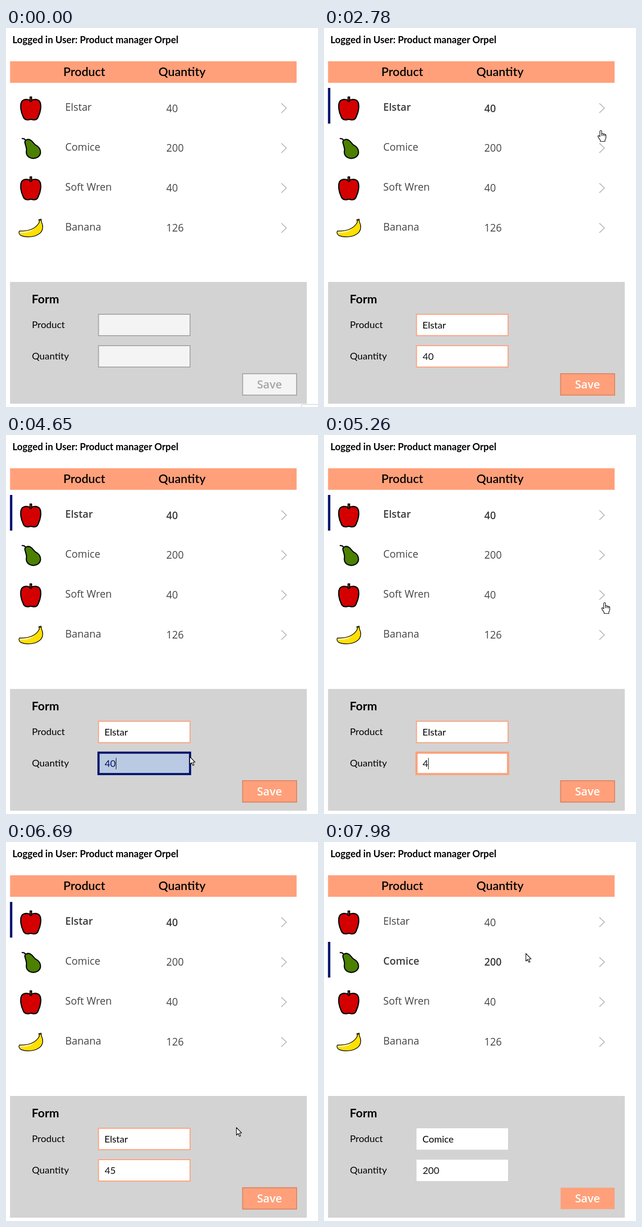
Write an HTML page that moves like this. It is 656 px wide and 797 px high and loops after 8000 ms.

```html
<!DOCTYPE html>
<html lang="en">
<head>
<meta charset="utf-8">
<title>Product form</title>
<style>
  html, body { margin: 0; width: 100%; height: 100%; overflow: hidden; background: #fff; }
  svg { display: block; font: 20px Lato, sans-serif; }
  .title { font-weight: 700; }
  .head { font-size: 25.2px; font-weight: 600; }
  .form { font-size: 25px; font-weight: 700; }
  .row { font: 21.33px "Open Sans", sans-serif; fill: #444; }
  .row.on { font-weight: 600; fill: #3a3a3a; }
  .row rect { display: none; fill: #00126b; }
  .row.on rect { display: inline; }
  .chevron { fill: none; stroke: #a2a2a2; stroke-width: 1.3; }
  .save { font: 600 23.5px "Open Sans", sans-serif; text-anchor: middle; }
  .line { fill: none; stroke: #000; }
  .cursor path { fill: #fff; stroke: #000; stroke-width: 1.2; stroke-linejoin: round; }
</style>
</head>
<body>
<svg width="656" height="797" viewBox="0 0 656 797">
  <defs>
    <g id="red" stroke="#000" stroke-width="2.6" stroke-linejoin="round">
      <path fill="#d40000" d="M52 153C46 149 36 149 32.5 156C29 164 32 178 36 186C38 192 42 193 45 193C48 193.500 50 192 52 192C54 192 57 193.500 60 193C63 193 66 192 68 186C72 178 75 164 71.500 156C68 149 58 149 52 153Z"/>
      <path fill="#a0410d" stroke-width="2" d="M50.500 145H54V154.500H50.500Z"/>
    </g>
    <g id="pear" stroke="#000" stroke-width="2.4" stroke-linecap="round">
      <path fill="none" d="M34 232.500Q40 232 42 238"/>
      <path fill="#4b8000" d="M40 242C38 236 46 232 52 236C57 239 58 243 62 246C70 250 74 257 72 265C69 273 59 276 51 273C44 270 42 264 43 258C44 252 41 247 40 242Z"/>
    </g>
    <g id="banana" stroke-linejoin="round">
      <path fill="#ffe000" stroke="#000" stroke-width="1.4" d="M69 403L74 402L74.500 408C78 414 79 424 72 431C62 440 44 441 33 437C28 435 26 431 28 427C38 427 50 426 58 421C65 417 69 411 70 408Z"/>
      <path fill="#ffeeb0" d="M29 428C40 429 52 426 60 422C52 430 40 432 29 431Z"/>
      <path fill="#4a3a00" d="M69 403L74 402L74.200 405L69.500 406Z"/>
    </g>
  </defs>

  <text class="title" x="13.5" y="31.500">Logged in User: Product manager Orpel</text>
  <rect x="8.5" y="70" width="602.5" height="45.300" fill="#ffa07a"/>
  <text class="head" x="120.5" y="101">Product</text>
  <text class="head" x="320.5" y="101">Quantity</text>
  <g id="rows"></g>

  <rect x="8.5" y="534" width="624" height="256" fill="#d3d3d3"/>
  <text class="form" x="54" y="579">Form</text>
  <text x="54.5" y="631">Product</text>
  <text x="54.5" y="697">Quantity</text>
  <rect id="productBox" x="194.5" y="602" width="192.5" height="45"/>
  <rect id="quantityBox" x="194.5" y="668" width="192.5" height="45"/>
  <rect id="saveBox" x="497.5" y="727" width="113.5" height="45"/>
  <text id="productText" x="207" y="632"></text>
  <text id="quantityText" x="207.500" y="698"></text>
  <path id="caret" class="line" d="M0 679V703"/>
  <text id="saveText" class="save" x="554" y="758">Save</text>
  <path id="corner" class="line" stroke="#c8c8c8" style="stroke:#c8c8c8" d="M621.500 797V791.500H656"/>

  <g id="cursor" class="cursor">
    <path id="arrow" d="M.5 .5V16.500L4.200 13L6.800 19L9.300 18L6.800 12H11.500Z"/>
    <g id="hand">
      <path d="M-1.900 2C-1.900 0 1.900 0 1.900 2V7.500C3 6.300 5 6.500 5.200 8.200C6.500 7.200 8 7.600 8.300 9.200C9.500 8.500 10.800 9.200 10.800 10.800V15C10.800 18 9 19 8.800 21V23.500H-1V21C-3 18 -5 16 -6 13C-6.500 11 -4 10.500 -1.900 13.500Z"/>
      <path style="fill:none" d="M1.900 7.500V12M5.200 8.200V12M8.300 9.200V12.500"/>
    </g>
    <path id="beam" style="fill:none" d="M-3 -8.500H3M0 -8.500V8.500M-3 8.500H3"/>
  </g>
</svg>
<script>
const $ = id => document.getElementById(id);
const set = (el, attrs) => { for (const k in attrs) el.setAttribute(k, attrs[k]); };
const show = (el, on) => { el.style.display = on ? "inline" : "none"; };

const NAVY = "#00126b", SALMON = "#ffa07a", GREY = "#a6a6a6", LOOP = 8000;
const products = [["red", "Elstar", 40], ["pear", "Comice", 200], ["red", "Soft Wren", 40], ["banana", "Banana", 126]];

// The red fruit is drawn in row 0; the others already sit in their own rows.
$("rows").innerHTML = products.map(([icon, name, quantity], i) => {
  const y = i * 84;
  return `<g class="row">
    <rect x="8.300" y="${126 + y}" width="5" height="75"/>
    <use href="#${icon}" y="${icon === "red" ? y : 0}"/>
    <text x="124.500" y="${174 + y}">${name}</text>
    <text x="337" y="${(i ? 176 : 177) + y}">${quantity}</text>
    <path class="chevron" d="M579 ${158.5 + y}l10.500 10l-10.500 10"/>
  </g>`;
}).join("");
const rows = [...document.querySelectorAll(".row")];

// Pointer moves: start, end, number of steps, evenly timed points.
const moves = [
  [920, 1400, 8, [[557, 391], [568, 295], [582, 200], [592, 156]]],
  [2780, 3000, 4, [[582, 215], [562, 370], [565, 560], [589, 684]]],
  [3330, 3400, 2, [[470, 688], [378, 690]]],
  [4520, 4650, 3, [[378, 690], [386, 676]]],
  [4910, 5110, 3, [[470, 540], [592, 336], [590, 352]]],
  [5860, 6130, 5, [[595, 351], [604, 360], [557, 398]]],
  [6200, 6690, 8, [[552, 412], [500, 530], [484, 600]]],
  [7280, 7770, 8, [[482, 585], [445, 380], [424, 234]]]
];

function pointerAt(t) {
  const move = moves.filter(m => t >= m[0]).pop();
  if (!move) return null;
  const [start, end, steps, points] = move;
  const step = Math.min(steps - 1, Math.floor((t - start) / (end - start) * (steps - 1) + 1e-6));
  const u = step / (steps - 1) * (points.length - 1);
  const i = Math.min(points.length - 2, Math.floor(u));
  return points[i].map((a, axis) => a + (points[i + 1][axis] - a) * (u - i));
}

function drawPointer(t) {
  const p = pointerAt(t);
  show($("cursor"), p);
  if (!p) return;
  const [x, y] = p.map(Math.round);
  const kind = x > 545 && y < 455 ? "hand" : x > 194 && x < 386 && y > 667 && y < 714 ? "beam" : "arrow";
  for (const id of ["arrow", "hand", "beam"]) show($(id), id === kind);
  set($("cursor"), { transform: `translate(${x} ${y})` });
}

function drawForm(t) {
  const enabled = t >= 1930, second = t >= 7910;
  const bordered = t >= 2060 && !second;
  const hover = t >= 3400 && t < 4910, focus = t >= 4520 && t < 6690;
  const edge = color => !enabled ? GREY : bordered ? color : "none";
  const fill = enabled ? "#fff" : "#f4f4f4";

  set($("productBox"), { fill, stroke: edge(SALMON), "stroke-width": 2 });
  set($("quantityBox"), {
    fill: hover ? "#bacae2" : fill,
    stroke: edge(hover ? NAVY : SALMON),
    "stroke-width": focus ? 4.500 : 2
  });
  set($("saveBox"), { fill: enabled ? SALMON : fill, stroke: edge("#db8562"), "stroke-width": 2 });
  set($("saveText"), { fill: enabled ? "#fff" : GREY });

  const typed = t < 5260 ? "40" : t < 5330 ? "4" : "45";
  $("productText").textContent = !enabled ? "" : second ? "Comice" : "Elstar";
  $("quantityText").textContent = !enabled ? "" : second ? "200" : typed;
  set($("quantityText"), { fill: hover ? NAVY : "#111" });

  const lastInput = [5330, 5260, 4520].find(s => t >= s);
  show($("caret"), focus && (t - lastInput) % 1060 < 530);
  set($("caret"), { transform: `translate(${typed.length > 1 ? 231.5 : 219.5})` });
}

function draw(now) {
  const t = now % LOOP;
  const selected = t < 1800 ? -1 : t < 7840 ? 0 : 1;
  rows.forEach((row, i) => row.classList.toggle("on", i === selected));
  show($("corner"), t < 70);
  drawForm(t);
  drawPointer(t);
}

const begin = performance.now();
function tick() {
  draw(performance.now() - begin);
  requestAnimationFrame(tick);
}
tick();
</script>
</body>
</html>
```
